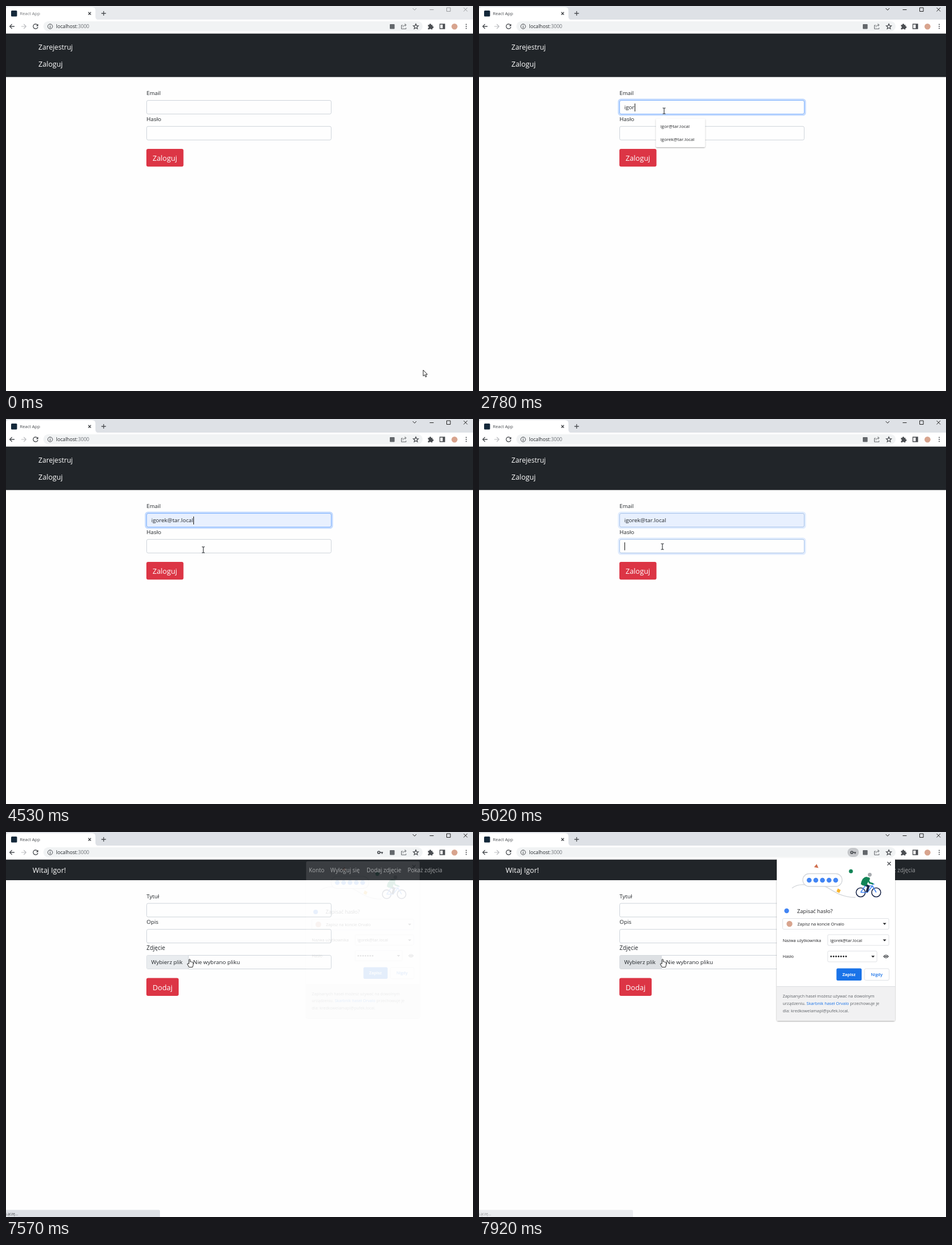
Recreate the animation shown at these times as an HTML page. Size 825 by 679 pixels, loop 7.99 s.

```html
<!DOCTYPE html>
<html lang="pl">
<head>
<meta charset="utf-8">
<title>React App</title>
<style>
  html, body { margin: 0; width: 100%; height: 100%; overflow: hidden; background: #fefefe; }
  svg { display: block; width: 825px; height: 679px; }
  text { font-family: "Open Sans", "Noto Sans", sans-serif; white-space: pre; }
  .preview { font-family: "Liberation Sans", Arial, sans-serif; }
  .line { fill: none; stroke: #4a4d51; stroke-width: 1.3; }
</style>
</head>
<body>
<svg id="stage" viewBox="0 0 825 679" xmlns="http://www.w3.org/2000/svg"></svg>
<script>
const LOOP = 7990;
const INK = '#212529';
const MAIL_A = 'igor@tar.local';
const MAIL_B = 'igorek@tar.local';
const PREFIX = 'igor';

// Markup helpers
const text = (x, y, size, str, fill = INK, extra = '') =>
  `<text x="${x}" y="${y}" font-size="${size}" fill="${fill}" ${extra}>${str}</text>`;
const rect = (x, y, w, h, fill, rx = 0, extra = '') =>
  `<rect x="${x}" y="${y}" width="${w}" height="${h}" rx="${rx}" fill="${fill}" ${extra}/>`;
const dot = (x, y, r, fill, extra = '') =>
  `<circle cx="${x}" cy="${y}" r="${r}" fill="${fill}" ${extra}/>`;
const path = (d, extra = 'class="line"') => `<path d="${d}" ${extra}/>`;
const group = (id, body, extra = '') => `<g id="${id}" ${extra}>${body}</g>`;
const dots = (n, x, y, gap, r, fill) =>
  Array.from({ length: n }, (_, i) => dot(x + i * gap, y, r, fill)).join('');

const field = (y, id = '') =>
  rect(248.5, y + .5, 326, 24, '#fefefe', 2.6, `stroke="#ced4da" ${id && `id="${id}"`}`);
const ring = (id, y) => group(id,
  rect(246.7, y - 1.3, 329.6, 27.6, 'none', 3.9, 'stroke="#0d6efd" stroke-opacity=".25" stroke-width="2.6"') +
  rect(248.5, y + .5, 326, 24, 'none', 2.6, 'stroke="#86b7fe"'));
const button = (y, w, label) =>
  rect(248, y, w, 31.3, '#dc3545', 3) + text(259, y + 21, 12.75, label, '#fff');
const caretDown = (x, y) => path(`M${x - 3} ${y - 1.5}h6l-3 3.2z`, 'fill="#202124"');
const selectBox = (x, y, w, h = 20) =>
  rect(x + .5, y + .5, w - 1, h - 1, '#fff', 2, 'stroke="#dfe1e5"');

function dropdown(id, w, rows, hover = '') {
  const h = rows.length * 23.6 + 3.4;
  return group(id,
    rect(312.6, 198.5, w, h, '#fff', 2, 'filter="url(#soft)"') +
    path('M320 199l6.5-6 6.5 6z', 'fill="#fff"') + hover +
    rows.map((r, i) => text(320.5, 214.5 + i * 23.6, 8, r, '#26282b')).join(''));
}

function keyIcon() {
  return group('key', rect(651, 28, 20, 16, '#c6c8cb', 8, 'id="keyPill"') +
    dot(658.6, 36, 2, 'none', 'stroke="#4a4d51" stroke-width="1.7"') +
    path('M661 36h5M664.4 36v2.4', 'fill="none" stroke="#4a4d51" stroke-width="1.7"'));
}

function browser() {
  const winIcons = path('M718.5 4l3.3 3.3L725 4M748.5 6.5h7M778.5 3h6.5v6.5h-6.5zM808.5 3l6.5 6.5M815 3l-6.5 6.5',
    'id="winIcons" fill="none" stroke-width="1"');
  return rect(0, 0, 825, 25, '#dee1e6', 0, 'id="strip"') +
    path('M0 25V7q0-5 5-5H152q6 0 6 6V19q0 5 6 5.5v.5z', 'fill="#fff"') +
    rect(9, 8, 10.5, 10.5, '#14283a', 1.5) +
    text(24.5, 16, 7.6, 'React App', INK, 'id="tabTitle"') +
    path('M145.3 10.7l4.8 4.8M150.1 10.7l-4.8 4.8M172.5 9v8M168.5 13h8') + winIcons +
    rect(0, 24, 825, 24.5, '#fff') + rect(66, 27, 670, 17.5, '#f1f3f4', 8.7) +
    path('M15 36H6.8M10.6 32l-4 4 4 4') +
    path('M27 36h8.2M31.4 32l4 4-4 4', 'fill="none" stroke="#bbbdc0" stroke-width="1.2"') +
    path('M55.7 33.6A4.2 4.2 0 1 0 56.3 37') + path('M57 31.5v4h-4z', 'fill="#4a4d51"') +
    dot(78, 36, 4.2, 'none', 'stroke="#4a4d51"') + path('M78 35.4v3M78 33.2v1.1') +
    text(88.5, 39, 8.7, 'localhost<tspan fill="#6c7075">:3000</tspan>') +
    keyIcon() +
    rect(678, 32, 8.5, 8.5, '#63676b', 1) +
    path('M701 34h-2.5v6.3h8.2v-2M701 37.5q.6-4 5.5-4M704.4 31.2l2.7 2.3-2.7 2.4',
      'fill="none" stroke="#63676b"') +
    path('M724 31.6l1.3 3 3.2.3-2.4 2.1.7 3.2-2.8-1.7-2.8 1.7.7-3.2-2.4-2.1 3.2-.3z') +
    path('M745.5 33.3h2.4a1.6 1.6 0 1 1 3.1 0h2.4v2.5a1.6 1.6 0 1 1 0 3.1v2.3h-2.5a1.6 1.6 0 0 0-3 0h-2.4v-2.5a1.5 1.5 0 0 0 0-3z', 'fill="#4a4d51"') +
    path('M766.5 32h8.5v8h-8.5z') + rect(771.5, 32, 3.5, 8, '#4a4d51') +
    dot(792.3, 36.3, 5.3, '#d8a48e') +
    dots(1, 813, 32.4, 0, 1, '#4a4d51') + dots(1, 813, 36, 0, 1, '#4a4d51') + dots(1, 813, 39.6, 0, 1, '#4a4d51');
}

function loginPage() {
  return group('login',
    rect(0, 48.3, 825, 77, INK) +
    text(57.3, 77, 12.15, 'Zarejestruj', '#fff') + text(57.3, 107, 12.65, 'Zaloguj', '#fff') +
    text(248.3, 157, 9.8, 'Email') + field(166, 'mailBox') +
    text(248.3, 203, 9.85, 'Hasło') + field(211.8) +
    button(252, 65.5, 'Zaloguj') +
    ring('mailRing', 166) + ring('passRing', 211.8) +
    text(256.7, 182.4, 9.85, '', INK, 'id="mail"') +
    group('pass', '') +
    rect(256.5, 172, 1, 14, '#111', 0, 'id="caret"') +
    dropdown('listAll', 133.5, ['wiktor31k@lato.local', 'wiktor84k@lato.local', 'wiktor.sowa271@kometa.local',
      '200735128460392', 'borys.zych@bx.local', 'brzozowianka7@chmura.local']) +
    dropdown('listMatch', 86.8, [MAIL_A, MAIL_B], rect(312.6, 199.5, 86.8, 23.6, '#e8e9eb', 0, 'id="hover"')));
}

function photoPage() {
  const links = [[535, 'Konto'], [573, 'Wyloguj się'], [637, 'Dodaj zdjęcie'], [709.5, 'Pokaż zdjęcia']];
  return group('photo',
    rect(0, 48.3, 825, 36.7, INK) + text(47, 72, 12.5, 'Witaj Igor!', '#fff') +
    links.map(([x, s]) => text(x, 71, 9.9, s, '#9b9d9f')).join('') +
    text(248.3, 116.5, 9.85, 'Tytuł') + field(125.4) +
    text(248.3, 162.3, 9.85, 'Opis') + field(171.2) +
    text(248.3, 208, 9.95, 'Zdjęcie') + field(217) +
    path('M322 217.5H251q-2.5 0-2.5 2.5v19q0 2.5 2.5 2.5h71z', 'id="pick"') +
    path('M322.2 217.5v24', 'stroke="#ced4da"') +
    text(256.5, 233.3, 9.85, 'Wybierz plik') + text(330.5, 233.3, 9.85, 'Nie wybrano pliku') +
    button(257.6, 57, 'Dodaj') +
    group('status', path('M0 666.5H270q2 0 2 2V679H0z', 'fill="#dee1e6"') +
      text(-1, 676, 6.6, 'Łączę...', '#4a4d51')));
}

function cyclist() {
  const wheel = x => dot(x, 106.5, 8, '#fff', 'stroke="#1f2b4d" stroke-width="1.6"');
  return wheel(674.3) + wheel(701.7) +
    path('M674.3 106.5L682 95h13l-9 11.5h-11.7M695 95l6.7 11.5M694 92h4.5', 'fill="none" stroke="#4285f4" stroke-width="1.6"') +
    path('M679 91l9 5-3 10', 'fill="none" stroke="#1f2b4d" stroke-width="4"') +
    path('M674.5 92q2-12 9.5-13l6 1.5q2 3-2 6l-3.5 8q-6 1.5-10-2.5z', 'fill="#118457"') +
    path('M686 82l4 7.5 6.5 2', 'fill="none" stroke="#118457" stroke-width="2.8"') +
    dot(690.3, 75.3, 3.4, '#a6aaae');
}

function popup() {
  return group('popup',
    rect(526, 46, 209, 287, '#fff', 3, 'filter="url(#soft)"') +
    path('M526 272.5H735V330q0 3-3 3H529q-3 0-3-3z', 'fill="#f1f1f2"') +
    path('M526 272.5h209', 'stroke="#dcdee1"') +
    path('M721.5 52.7l6 6M727.5 52.7l-6 6') +
    path('M553 99q9-7 22-6h26c18 1 28 22 64 22.5', 'fill="none" stroke="#d3d6da" stroke-width="1.3"') +
    rect(572, 73.5, 69.5, 22.5, '#fff', 11.2, 'stroke="#d3d6da" stroke-width="1.3"') +
    dots(5, 583.3, 85, 11.7, 4.3, '#4285f4') +
    path('M596.5 56.5l3.2 7-7.8-1.4z', 'fill="#d0704f"') +
    dot(657, 69.3, 3.5, '#118457') + path('M634 99.5l5 3-2.5 5-5-2.5z', 'fill="#f7b52f"') +
    cyclist() +
    dot(543.5, 139, 4.2, '#4285f4') + text(562, 142.5, 9.4, 'Zapisać hasło?', '#202124') +
    selectBox(536, 152, 188.5) + dot(548.5, 162, 5.2, '#d8a48e') +
    text(562.5, 164.7, 7.5, 'Zapisz na koncie Orvalo', '#202124') + caretDown(716.5, 162) +
    text(536.5, 193.5, 7.45, 'Nazwa użytkownika', '#202124') +
    selectBox(615.5, 180.5, 109) + text(620.5, 193.5, 7.5, MAIL_B, '#202124') + caretDown(716.5, 191) +
    text(536.5, 222, 7.45, 'Hasło', '#202124') +
    selectBox(615.5, 209.5, 88) + dots(7, 622, 219.5, 4.4, 1.4, '#202124') + caretDown(696, 219.7) +
    path('M714 219.5q5-6.5 10 0q-5 6.5-10 0z', 'fill="#4a4d51"') +
    dot(719, 219.5, 2, '#4a4d51', 'stroke="#fff" stroke-width=".9"') +
    rect(631.5, 240.5, 44.5, 21.5, '#1a73e8', 2.5) +
    text(653.6, 253.8, 7.5, 'Zapisz', '#fff', 'text-anchor="middle" font-weight="700"') +
    rect(681, 241, 43.5, 20.5, '#fff', 2.5, 'stroke="#dfe1e5"') +
    text(702.6, 253.8, 7.5, 'Nigdy', '#1a73e8', 'text-anchor="middle" font-weight="600"') +
    text(536.5, 292, 7.4, 'Zapisanych haseł możesz używać na dowolnym', '#5f6368') +
    text(536.5, 305, 7.4, 'urządzeniu. <tspan fill="#1a73e8">Skarbnik haseł Orvalo</tspan> przechowuje je', '#5f6368') +
    text(536.5, 318, 7.4, 'dla: kredkowelamapl@pufek.local.', '#5f6368'));
}

function pointers() {
  const skin = 'fill="#fff" stroke="#222" stroke-width="1" stroke-linejoin="round"';
  return group('arrow', path('M0 0V10.6L2.5 8.4 4.2 12.3 6 11.5 4.3 7.8H7.4z', skin)) +
    group('beam', path('M-2.5-5.2q2.5 0 2.5 1V4q0 1.2-2.5 1.2M2.5-5.2Q0-5.2 0-4.2V4q0 1.2 2.5 1.2', 'class="line" stroke-width="1"')) +
    group('hand', path('M-1.8 1V-6q1.2-1.6 2.2 0V-2q1.3-1 2 .3 1.3-.7 1.8.4 1.5-.5 1.5 1.2V3.5L4.5 7.4H-1.6L-4.8 1.8q.3-1.8 3-.4z', skin));
}

stage.innerHTML =
  `<defs><filter id="soft" x="-10%" y="-10%" width="120%" height="120%">
    <feDropShadow dx="0" dy="1" stdDeviation="1.3" flood-color="#000" flood-opacity=".35"/></filter></defs>` +
  rect(0, 0, 825, 679, '#fefefe') + loginPage() + photoPage() + browser() + popup() + pointers();

const $ = id => document.getElementById(id);
const set = (id, name, value) => $(id).setAttribute(name, value);
const show = (id, on) => set(id, 'visibility', on ? 'inherit' : 'hidden');
const clamp = v => Math.max(0, Math.min(1, v));
const ease = p => p * p * (3 - 2 * p);
const count = (t, times) => times.filter(at => t >= at).length;
const between = (t, a, b) => t >= a && t < b;

// Pointer moves: first step, last step, number of steps, end x, end y
const START = [737, 642];
const MOVES = [
  [70, 780, 11, 314, 181],
  [2780, 2780, 1, 327, 185],
  [3180, 3450, 5, 348.5, 212],
  [4060, 4130, 2, 350, 231],
  [4480, 4880, 7, 324, 225],
  [7570, 7570, 1, 325, 231]
];
function pointerAt(t) {
  let [x, y] = START;
  for (const [from, to, n, ex, ey] of MOVES) {
    if (t < from) break;
    const step = to > from ? Math.floor((t - from) / (to - from) * (n - 1) + .01) + 1 : n;
    const p = ease(clamp(step / n));
    x += (ex - x) * p;
    y += (ey - y) * p;
  }
  return [x, y];
}

const TYPED = [1850, 2120, 2650, 2780];
const SECRET = [5820, 6030, 6230, 6360, 6690, 6760, 7030];
const CARET_ON = [[850, 1320], [1850, 3320], [4400, 5490], [5820, 7570]];

function mailAt(t) {
  if (t < 3450) return PREFIX.slice(0, count(t, TYPED));
  return t < 4130 ? MAIL_A : MAIL_B;
}

function draw(t) {
  const active = t >= 780, done = t >= 7570, inPass = t >= 4950;
  set('strip', 'fill', active ? '#dee1e6' : '#e8eaed');
  set('tabTitle', 'fill', active ? '#45494d' : '#74777b');
  set('winIcons', 'stroke', active ? '#222' : '#999b9e');

  show('login', !done);
  show('photo', done);
  show('key', t >= 5820);
  show('keyPill', t >= 7640);

  const leave = clamp((t - 4950) / 140);
  set('mailRing', 'opacity', clamp((t - 780) / 140) * (1 - leave));
  set('passRing', 'opacity', leave);
  set('mailBox', 'fill', t >= 3450 ? '#e8f0fe' : '#fefefe');

  const preview = between(t, 3450, 4400);
  $('mail').textContent = mailAt(t);
  set('mail', 'class', preview ? 'preview' : '');
  set('mail', 'font-size', preview ? 8.67 : 9.85);

  const secret = count(t, SECRET);
  $('pass').innerHTML = dots(secret, 258.8, 224.8, 4.2, 1.35, INK);
  const caretX = inPass ? 256.5 + secret * 4.2 : 256.7 + $('mail').getComputedTextLength();
  set('caret', 'x', Math.round(caretX));
  set('caret', 'y', inPass ? 217.5 : 172);
  show('caret', !done && CARET_ON.some(([a, b]) => between(t, a, b)));

  show('listAll', between(t, 850, 1920));
  show('listMatch', between(t, 1920, 4400));
  show('hover', between(t, 3450, 4400));
  set('hover', 'y', t < 4130 ? 199.3 : 222.9);

  const pop = clamp((t - 7545) / 235);
  const size = .955 + .045 * pop;
  set('popup', 'opacity', done ? pop : 0);
  set('popup', 'transform', `translate(630.5 189.5) scale(${size}) translate(-630.5 -189.5)`);
  set('pick', 'fill', t < 7640 ? '#e9ecef' : '#dde0e3');
  set('status', 'opacity', t < 7850 ? 1 : t < 7920 ? .8 : .6);

  const [x, y] = pointerAt(t);
  const inField = x > 248 && x < 575 &&
    (between(y, 166, 191) || (t >= 4400 && between(y, 212, 237)));
  const kind = done ? 'hand' : inField ? 'beam' : 'arrow';
  for (const id of ['arrow', 'beam', 'hand']) show(id, id === kind);
  set(kind, 'transform', `translate(${x} ${y})`);
}

const began = performance.now();
function tick() {
  draw((performance.now() - began) % LOOP);
  requestAnimationFrame(tick);
}
tick();
</script>
</body>
</html>
```
